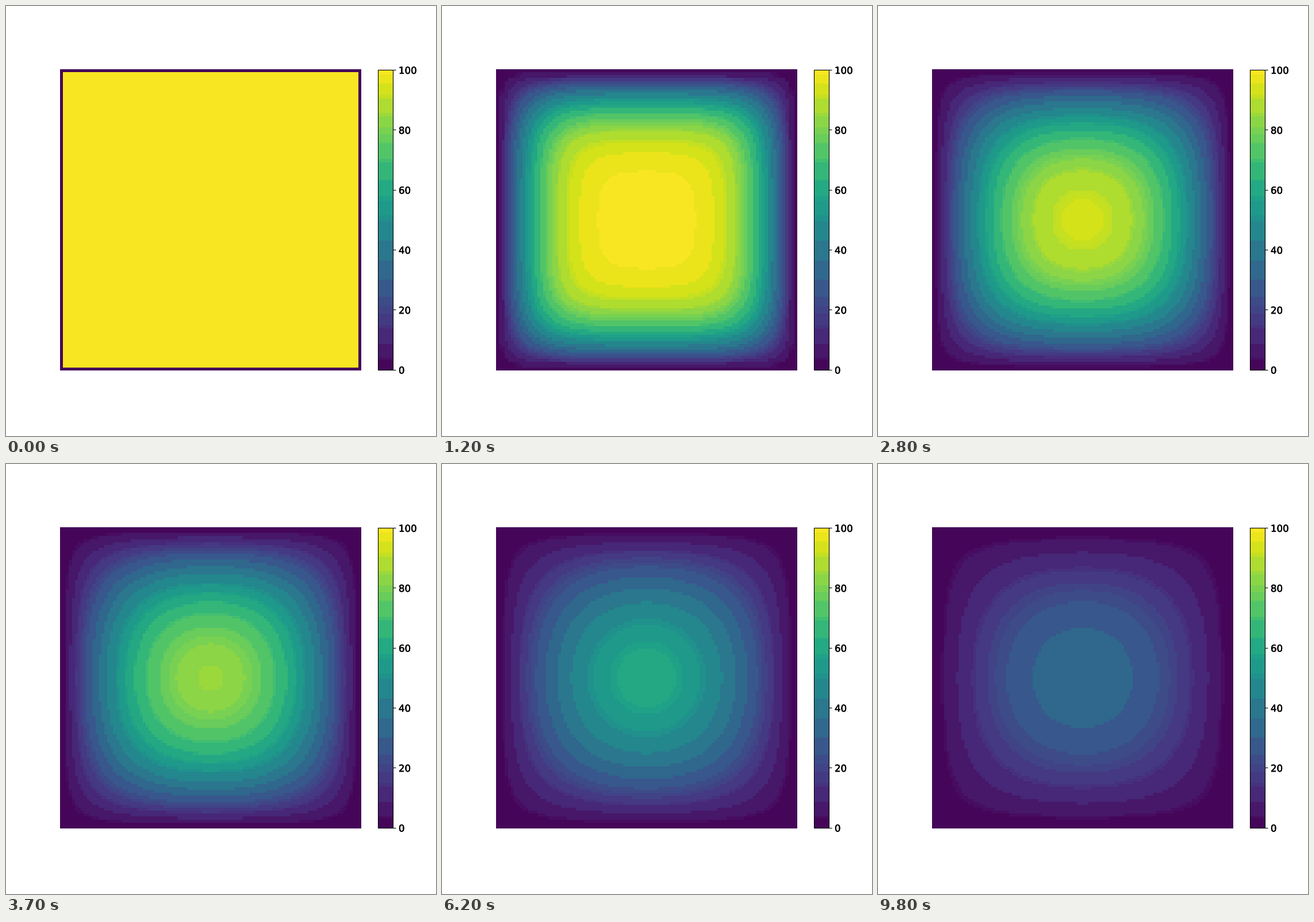
A matplotlib script for the animation above (10000 ms loop, 748 px wide and 748 px high).

```python
import numpy as np
import matplotlib.pyplot as plt
from matplotlib.animation import FuncAnimation
from matplotlib.colors import ListedColormap
from matplotlib.patheffects import withStroke

STAGE = 748
FRAMES = 100
INTERVAL = 100
CELLS = 100       # interior cells per side, framed by a cold border
MESH_RATIO = 8.1  # diffusivity * dt / dx**2


def banded_viridis():
    """Viridis with similar shades merged into their mean colour."""
    rgb = np.round(plt.cm.viridis(np.arange(256))[:, :3] * 255)
    _, band = np.unique(rgb // (32, 16, 32), axis=0, return_inverse=True)
    band = band.reshape(-1)
    return ListedColormap([rgb[band == b].mean(axis=0) / 255 for b in band])


def cooling_profiles():
    """Crank-Nicolson steps of a 1D bar with both ends held at zero."""
    eye = np.eye(CELLS)
    laplacian = np.eye(CELLS, k=1) + np.eye(CELLS, k=-1) - 2 * eye
    half = MESH_RATIO / 2 * laplacian
    step = np.linalg.solve(eye - half, eye + half)
    profiles = [np.ones(CELLS)]
    for _ in range(FRAMES - 1):
        profiles.append(step @ profiles[-1])
    return [np.pad(p, 1) for p in profiles]


PROFILES = cooling_profiles()


def temperature(frame):
    # Alternating-direction steps keep the square plate separable.
    return 100 * np.outer(PROFILES[frame], PROFILES[frame])


def pixel_axes(fig, left, top, width, height):
    bottom = STAGE - top - height
    return fig.add_axes([v / STAGE for v in (left, bottom, width, height)])


fig = plt.figure(figsize=(STAGE / 100, STAGE / 100), dpi=100,
                 facecolor="white")
ax = pixel_axes(fig, 94, 110, 523.99, 523.99)
ax.axis("off")
plate = ax.imshow(temperature(0), cmap=banded_viridis(), vmin=0, vmax=100,
                  interpolation="nearest", aspect="auto")

bar_ax = pixel_axes(fig, 646.7, 110.9, 26.5, 521.6)
bar = fig.colorbar(plate, cax=bar_ax, ticks=range(0, 101, 20))
bar_ax.tick_params(labelsize=12)
for label in bar_ax.get_yticklabels():
    label.set_fontfamily("DejaVu Sans")
    label.set_path_effects([withStroke(linewidth=0.4, foreground="black")])


def update(frame):
    plate.set_data(temperature(frame))
    return [plate]


anim = FuncAnimation(fig, update, frames=FRAMES, interval=INTERVAL,
                     repeat=True, repeat_delay=0, blit=False)
plt.show()
```
